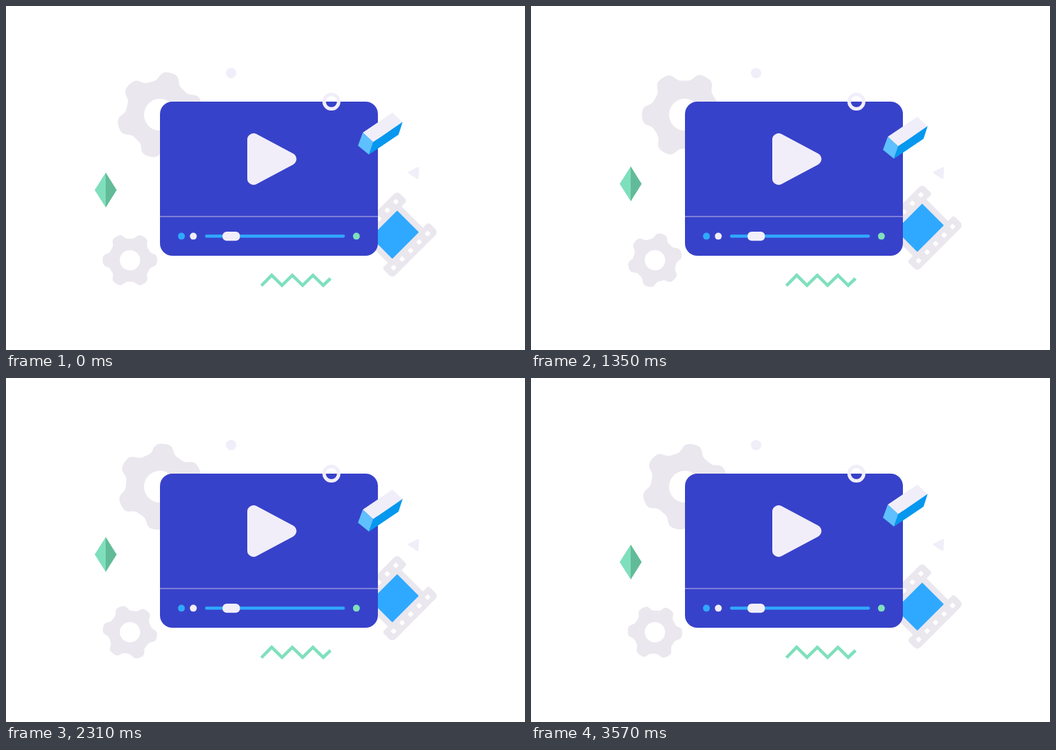
These frames come from a looping animation (755x500 px, 3600 ms). An HTML page:

```html
<!DOCTYPE html>
<html lang="en">
<head>
<meta charset="utf-8">
<title>Video player</title>
<style>
  html, body { margin: 0; width: 100%; height: 100%; overflow: hidden; background: #fff; }
  svg { display: block; width: 755px; height: 500px; }
</style>
</head>
<body>
<svg viewBox="0 0 755 500">
  <g fill="#eae7ee" fill-rule="evenodd">
    <path id="bigGear"/>
    <path id="smallGear"/>
  </g>

  <g id="film">
    <g transform="translate(565.5 332.3) rotate(45)">
      <path fill="#eae7ee" d="M-35.5-47.5H-26Q-22-47.5-22-43.5V-36H22V-43.5Q22-47.5 26-47.5H35.5Q42.5-47.5 42.5-40.5V40.5Q42.5 47.5 35.5 47.5H26Q22 47.5 22 43.5V36H-22V43.5Q-22 47.5-26 47.5H-35.5Q-42.5 47.5-42.5 40.5V-40.5Q-42.5-47.5-35.5-47.5Z"/>
      <g id="holes" fill="#fff"></g>
      <rect x="-22.3" y="-27.3" width="44.6" height="54.6" rx="1" fill="#2fa9ff"/>
    </g>
  </g>

  <rect x="224" y="139" width="317" height="224" rx="18" fill="#3742ca"/>
  <path d="M224 306H541" stroke="#9493de" stroke-width="1.5"/>
  <path d="M360 194V251L413.5 222.5Z" fill="#f1eef9" stroke="#f1eef9" stroke-width="18" stroke-linejoin="round"/>

  <circle cx="255.2" cy="334.6" r="5" fill="#2fa9ff"/>
  <circle cx="272.5" cy="334.6" r="5" fill="#f1eef9"/>
  <rect x="289.5" y="332.2" width="203.5" height="4.6" rx="2.3" fill="#2fa9ff"/>
  <rect x="315" y="328" width="25.3" height="13.2" rx="6" fill="#f1eef9"/>
  <circle cx="509.7" cy="334.6" r="5" fill="#7fe0bd"/>

  <circle cx="327.5" cy="97.5" r="7.6" fill="#f0eef8"/>
  <circle cx="473.4" cy="139" r="10.6" fill="none" stroke="#f1eef9" stroke-width="5"/>
  <path d="M586.5 242L599.5 235.5L598.5 250Z" fill="#f0eef8" stroke="#f0eef8" stroke-width="3" stroke-linejoin="round"/>
  <path d="M371.5 406.5L386.5 391.3L401.5 406L416.5 391.3L431.5 406L446.5 391.3L461.5 406L472 396" fill="none" stroke="#7fe0bd" stroke-width="4.5"/>

  <g id="block">
    <path d="M519 184L562 155L577 169L534 198Z" fill="#f0eef8"/>
    <path d="M519 184L534.5 198L528 216L512 203Z" fill="#5fc0ff"/>
    <path d="M534 198L577 168.5L571 187L528 216Z" fill="#0598ee"/>
  </g>

  <g id="gem">
    <path d="M145.2 242V293L129 267.5Z" fill="#7fdfbc"/>
    <path d="M145 242L161 267.5L145 293Z" fill="#62bb98"/>
  </g>
</svg>
<script>
const LOOP = 3600;
const el = id => document.getElementById(id);

// Six soft teeth around a round hole
function gearPath(radius, hole) {
  const k = 1.8, pts = [];
  for (let deg = 0; deg < 360; deg += 2) {
    const a = deg * Math.PI / 180;
    const r = radius * (0.895 + 0.105 * Math.tanh(k * Math.cos(6 * a)) / Math.tanh(k));
    pts.push((r * Math.sin(a)).toFixed(2) + ' ' + (-r * Math.cos(a)).toFixed(2));
  }
  return `M${pts.join('L')}ZM${-hole} 0a${hole} ${hole} 0 1 0 ${2 * hole} 0a${hole} ${hole} 0 1 0 ${-2 * hole} 0Z`;
}

el('bigGear').setAttribute('d', gearPath(62.6, 23.2));
el('smallGear').setAttribute('d', gearPath(39.6, 14.8));

let holes = '';
for (const x of [-32.7, 32.7]) {
  for (let i = -2; i <= 2; i++) {
    holes += `<rect x="${x - 3.1}" y="${i * 17.5 - 3.1}" width="6.2" height="6.2" rx="1.2"/>`;
  }
}
el('holes').innerHTML = holes;

function place(id, x, y, angle = 0) {
  el(id).setAttribute('transform', `translate(${x} ${y}) rotate(${angle})`);
}

function draw(ms) {
  const turn = (ms % LOOP) / LOOP;
  const lift = (1 - Math.cos(turn * 4 * Math.PI)) / 2;
  place('bigGear', 224, 158, 14 + 360 * turn);
  place('smallGear', 180.3, 369.5, 30 - 360 * turn);
  place('film', 0, -20 * lift);
  place('gem', 0, -18 * lift);
  place('block', 0, 12 * lift);
}

const start = performance.now();
function tick() {
  draw(performance.now() - start);
  requestAnimationFrame(tick);
}
draw(0);
requestAnimationFrame(tick);
</script>
</body>
</html>
```
